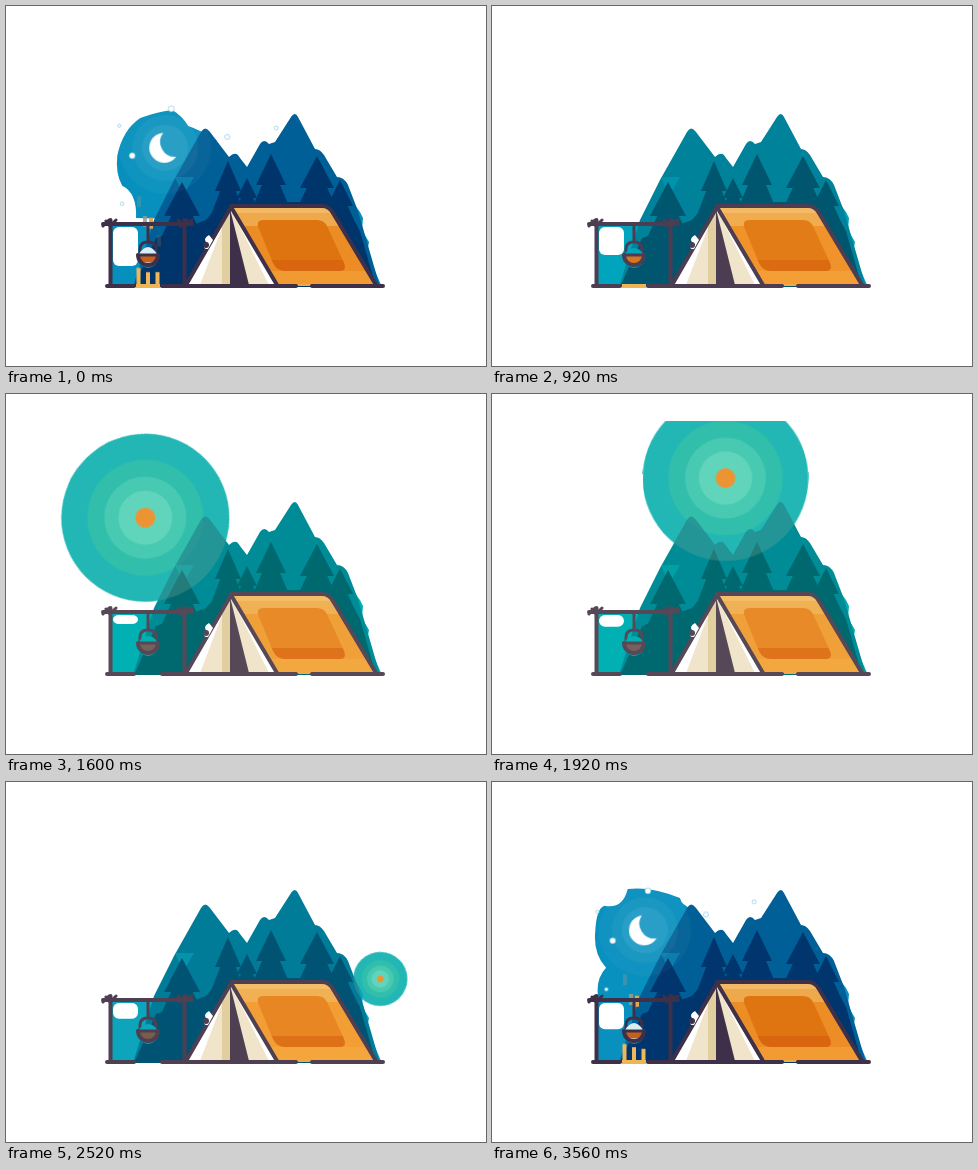
Write an HTML page that moves like this. It is 480 px wide and 360 px high and loops after 3.6 s.

```html
<!DOCTYPE html>
<html lang="en">
<head>
<meta charset="utf-8">
<title>Camp day and night</title>
<style>
@property --far { syntax: "<color>"; inherits: true; initial-value: #005f96; }
@property --near { syntax: "<color>"; inherits: true; initial-value: #00356c; }
@property --sky { syntax: "<color>"; inherits: true; initial-value: #0790bd; }
@property --ink { syntax: "<color>"; inherits: true; initial-value: #3e3048; }
@property --roof { syntax: "<color>"; inherits: true; initial-value: #ec8c24; }
@property --panel { syntax: "<color>"; inherits: true; initial-value: #de7410; }
@property --pot { syntax: "<color>"; inherits: true; initial-value: #c8601c; }

html, body { margin: 0; width: 100%; height: 100%; overflow: hidden; background: #fff; }
svg { display: block; width: 480px; height: 360px; animation: tint 3.6s linear infinite; }
svg * { transform-box: view-box; }

@keyframes tint {
  0%, 12.2%, 100% { --far: #005f96; --near: #00356c; --sky: #0790bd; --ink: #3e3048; --roof: #ec8c24; --panel: #de7410; --pot: #c8601c; }
  25.6% { --far: #00829a; --near: #00566e; --sky: #00a4bc; --ink: #4c3d52; --roof: #f0932a; --panel: #e27c16; --pot: #d8741c; }
  44.4%, 61.1% { --far: #008c96; --near: #00686f; --sky: #00b0b2; --ink: #574858; --roof: #f0a038; --panel: #e88a28; --pot: #74625a; }
  81.1% { --far: #00659a; --near: #003a78; --sky: #1e98c6; --ink: #43344a; --roof: #f59c30; --panel: #e5801a; --pot: #7a5a34; }
}

.far { fill: var(--far); }
.near { fill: var(--near); }
.sky { fill: var(--sky); }
.ink { fill: none; stroke: var(--ink); stroke-width: 4; stroke-linecap: round; stroke-linejoin: round; }
.thin { stroke-width: 3; }

.orbit { transform-origin: 237px 224px; }
.moon { animation: moon 3.6s linear infinite; }
@keyframes moon {
  0% { transform: rotate(0deg); opacity: 1; }
  12.22% { transform: rotate(66.5deg); opacity: 1; }
  15.5% { transform: rotate(85deg); opacity: 1; }
  17% { transform: rotate(94deg); opacity: 0; }
  17.01%, 92.5% { transform: rotate(-38deg); opacity: 0; }
  97% { transform: rotate(-14deg); opacity: 1; }
  98.89% { transform: rotate(-4.5deg); opacity: 1; }
  100% { transform: rotate(0deg); opacity: 1; }
}

.sun { animation: sun 3.6s linear infinite; }
@keyframes sun {
  0%, 26% { transform: rotate(-133deg); }
  31.11% { transform: rotate(-108.7deg); }
  44.44% { transform: rotate(-44.4deg); }
  61.11% { transform: rotate(35.9deg); }
  74%, 100% { transform: rotate(98deg); }
}
.grow { transform-origin: 237px 84px; animation: grow 3.6s linear infinite; }
@keyframes grow {
  0%, 26% { transform: scale(0); }
  30.6%, 44.4% { transform: scale(1); }
  61.1%, 64% { transform: scale(.975); }
  73%, 100% { transform: scale(0); }
}
.veil { opacity: .28; filter: sepia(.6); }

.glow { animation: glow 3.6s linear infinite; }
@keyframes glow {
  0%, 100% { d: path("M130 212Q131 187 116 180Q109 168 111 150Q116 124 134 112Q150 106 166 104Q176 110 182 120Q194 124 210 134L235 215Z"); }
  12.22% { d: path("M146 215Q177 168 213 102Q222 68 240 61Q266 56 277 72Q286 52 302 53Q326 72 302 77Q338 100 321 150L300 215Z"); }
  15.56% { d: path("M240 215Q240 170 255 150Q256 124 265 110Q280 98 290 95Q304 90 318 92Q340 104 338 130Q346 150 340 180L330 215Z"); }
  17.2% { d: path("M290 215Q290 210 290 205Q290 200 295 200Q300 200 300 200Q305 200 305 200Q310 205 310 210Q310 212 310 215L305 215Z"); }
  17.21%, 93% { d: path("M150 235Q148 230 148 228Q148 225 150 225Q152 225 154 225Q156 225 158 225Q160 226 160 228Q160 230 160 232L160 235Z"); }
  98.89% { d: path("M106 218Q102 198 114 186Q101 172 103 150Q104 126 112 124Q130 128 135 107Q160 104 188 116Q190 124 199 126L200 218Z"); }
}

.gap { animation: gap 3.6s linear infinite; }
@keyframes gap {
  0%, 100% { height: 39px; }
  12.2% { height: 36px; }
  25.6% { height: 28px; }
  44.4% { height: 9px; }
  61.1% { height: 14px; }
  81.1% { height: 18px; }
  98.9% { height: 26px; }
}

.night { animation: night 3.6s linear infinite; }
@keyframes night {
  0%, 15% { opacity: 1; }
  23%, 86% { opacity: 0; }
  93%, 100% { opacity: 1; }
}
.log { animation: log 3.6s linear infinite; }
@keyframes log {
  0%, 26% { opacity: 1; }
  30%, 85% { opacity: 0; }
  90%, 100% { opacity: 1; }
}
.flame { transform-origin: 0 281px; animation: flick .36s ease-in-out infinite alternate; }
@keyframes flick { from { transform: scaleY(1.2); } to { transform: scaleY(.85); } }
.steam { animation: steam .9s linear infinite; }
@keyframes steam {
  0% { transform: translateY(0); opacity: 0; stroke: #f0a848; }
  25% { opacity: 1; stroke: #e8a850; }
  60% { opacity: .8; stroke: #7d9c9c; }
  100% { transform: translateY(-46px); opacity: 0; stroke: #5f93a8; }
}
</style>
</head>
<body>
<svg viewBox="0 0 480 360">
  <defs>
    <path id="range" d="M127 281L148 214L168 174L195 126Q199 119 204 126L223 151Q230 144 234 152L241 161L254 138Q258 132 263 138L269 136L285 111Q289 105 292 111L309 143Q314 143 318 149L331 171Q338 171 342 179L352 205L374 281Z"/>
    <clipPath id="hills"><use href="#range"/></clipPath>
    <clipPath id="frame"><rect y="27" width="480" height="254"/></clipPath>
    <clipPath id="roofClip"><path d="M225 201H316Q323 201 327 207L369 279H271Z"/></clipPath>
    <clipPath id="panelClip"><path id="panel" d="M258 214H311Q318 214 321 220L338 257Q341 265 334 265H279Q271 265 267 257L253 223Q249 214 258 214Z"/></clipPath>
  </defs>

  <path class="sky glow"/>
  <path class="sky" d="M104 218H182V281H116Q112 276 104 280Z"/>
  <rect class="gap" x="107" y="221" width="25" rx="6" fill="#fff"/>
  <g class="orbit moon" id="moon" fill="#fff">
    <path d="M157 127A15 15 0 1 0 170 151A15 15 0 0 1 157 127Z"/>
  </g>
  <g class="suns" clip-path="url(#frame)"></g>

  <path class="sky" d="M342 190L354 206L357 212L356 224L363 236L361 247L376 281H300Z"/>
  <use href="#range" class="far"/>
  <path class="sky" opacity=".55" d="M169 171H188L177 190Z"/>
  <g class="near" id="trees"></g>

  <g class="orbit moon" fill="#fff">
    <circle cx="159" cy="142" r="23" opacity=".07"/>
    <circle cx="159" cy="142" r="33" opacity=".04"/>
    <circle cx="159" cy="142" r="46" opacity=".03"/>
  </g>
  <g clip-path="url(#hills)"><g class="suns veil"></g></g>

  <!-- tent -->
  <path d="M225 201L180 279H271Z" fill="#f0e4ca"/>
  <path d="M222 206L180 279H194Z" fill="#fff"/>
  <path d="M224 204L216 220V279H225Z" fill="#e2cf9f"/>
  <path d="M225 203L263 279H271Z" fill="#fff"/>
  <path d="M224 203V279H243Z" fill="var(--ink)"/>
  <g clip-path="url(#roofClip)">
    <rect x="220" y="198" width="155" height="84" fill="var(--roof)"/>
    <path d="M220 198H340V220H220Z" fill="#f0bd68" opacity=".6"/>
    <path d="M220 198H340V207H220Z" fill="#fad38e" opacity=".35"/>
    <path d="M250 265H375V281H250Z" fill="#f8b850" opacity=".3"/>
  </g>
  <use href="#panel" fill="var(--panel)"/>
  <rect x="250" y="254" width="95" height="12" fill="#d0500a" opacity=".4" clip-path="url(#panelClip)"/>
  <path class="ink" d="M225 201L180 279M225 201L271 279M225 200H316Q323 200 327 207L370 279"/>
  <path d="M203 229Q196 233 201 237Q195 243 202 243L207 234Z" fill="#fff"/>
  <circle cx="200" cy="239" r="3" fill="var(--ink)"/>

  <!-- fire, pot and frame -->
  <g class="night" fill="none" stroke="#f0b858" stroke-width="4" id="fire"></g>
  <path class="log" d="M130 280H154" stroke="#eeb552" stroke-width="4"/>
  <path class="ink" d="M101 280H128M156 280H207M205 280H290M306 280H377M104.500 214V280M178.500 214V280M97 218H186"/>
  <path class="ink thin" d="M97 220L103 214M100 215L104 220L110 214M172 214L178 220L186 214M174 220L181 214"/>
  <path d="M292 279H304" stroke="#f0a848" stroke-width="2"/>
  <path class="ink thin" d="M142 219V236M134 250V243Q134 236 142 236Q150 236 150 243V250"/>
  <circle cx="142" cy="252" r="10" fill="var(--sky)"/>
  <path d="M132 249H152A10 10 0 0 1 132 249Z" fill="var(--pot)"/>
  <g class="night">
    <path d="M133 248Q142 234 151 248Z" fill="#d8eef2"/>
    <path d="M136 255Q142 262 148 255Q142 258 136 255Z" fill="#fff"/>
  </g>
  <path class="ink" d="M132 249A10 10 0 1 0 152 249"/>
  <path class="ink thin" d="M132 249H152"/>
</svg>
<script>
const $ = s => document.querySelector(s);
const circle = (x, y, r, fill) => `<circle cx="${x}" cy="${y}" r="${r}" fill="${fill}"/>`;

// Three-tier pine: tip, half width and height of the first tier
const tree = (x, y, w, h) => {
  const side = s => [[w, h], [w * .6, h], [w * 1.35, h * 1.85], [w * .9, h * 1.85], [w * 1.8, h * 2.8]]
    .map(([a, b]) => `${x + s * a} ${y + b}`);
  return `<path d="M${x} ${y}L${side(1).join("L")}V281H${x - w * 1.8}L${side(-1).reverse().join("L")}Z"/>`;
};
const undergrowth = `<path d="M128 281L150 232L200 214L215 196H338L354 225L370 281Z"/>`;
$("#trees").innerHTML = undergrowth + [
  [176, 176, 18, 34], [222, 155, 13, 30], [241, 172, 10, 20],
  [265, 148, 15, 31], [311, 150, 17, 32], [334, 174, 13, 26]
].map(t => tree(...t)).join("");

const rings = [[84, "#22b7b5"], [58, "#31bfac"], [41, "#48cab2"], [27, "#60d5bb"], [10, "#ec9434"]];
document.querySelectorAll(".suns").forEach(g => {
  g.innerHTML = `<g class="orbit sun"><g class="grow">${rings.map(([r, c]) => circle(237, 84, r, c)).join("")}</g></g>`;
});

const stars = [[126, 150, 3], [165, 103, 3], [221, 131, 2.5], [270, 122, 2], [113, 120, 1.6], [116, 198, 1.8]];
$("#moon").innerHTML += `<g stroke="#5bb4d4" stroke-width=".5">${stars.map(s => circle(...s, "#fff")).join("")}</g>`;

const steam = [[133, 238], [139, 246], [145, 236], [153, 242]];
$("#fire").innerHTML =
  [132.5, 142, 151.5].map((x, i) =>
    `<path class="flame" style="animation-delay:${-i * .24}s" d="M${x} 265V280"/>`).join("") +
  steam.map(([x, y], i) =>
    `<path class="steam" style="animation-delay:${i * .23 - 1.62}s" d="M${x} ${y}v-11"/>`).join("");
</script>
</body>
</html>
```
